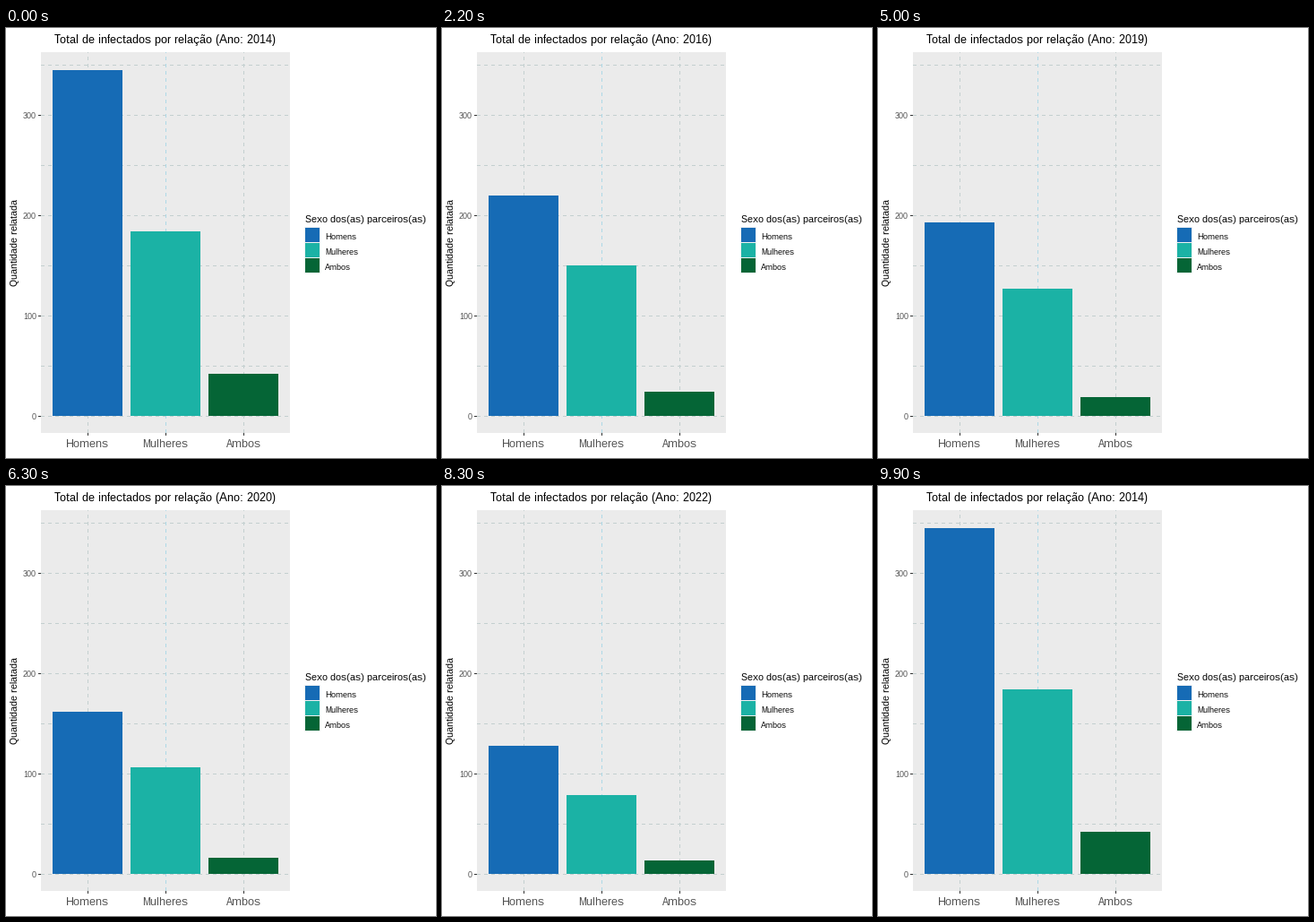
Animation of 480x480 px, one loop 10 s. Source, as a matplotlib script:

```python
import numpy as np
import matplotlib.pyplot as plt
from matplotlib.animation import FuncAnimation
from matplotlib.patches import Rectangle

plt.rcParams.update({
    "font.family": "Liberation Sans",
    "text.hinting": "native",
    "text.hinting_factor": 1,
})

SIZE, DPI = 480, 80
PX = 72 / DPI  # points per pixel
FRAMES, INTERVAL = 100, 100

ZERO_Y, UNIT = 433, 1.12
BAR_W = 78
LEFTS = [52, 139, 226]
CENTERS = [91, 178, 265]
NAMES = ["Homens", "Mulheres", "Ambos"]
COLORS = ["#166BB5", "#1BB2A5", "#056536"]
DARK, GREY = "#333333", "#4D4D4D"
GRID, GRID_MID = "#C3CFCF", "#ADD8E6"

FIRST_YEAR = 2014
DATA = np.array([
    [345, 184, 42],
    [280, 168, 34],
    [219, 152, 24],
    [222, 130, 21],
    [218, 124, 17],
    [193, 127, 19],
    [168, 112, 20],
    [150, 94, 9],
    [145, 92, 16],
    [93, 51, 9],
])
# Frames at which each year is reached and left again
ARRIVE = [0, 10, 20, 30, 40, 50, 59, 69, 79, 89, 99]
LEAVE = [0, 11, 21, 31, 41, 50, 60, 70, 80, 90, 99]

fig = plt.figure(figsize=(SIZE / DPI, SIZE / DPI), dpi=DPI, facecolor="white")
ax = fig.add_axes([0, 0, 1, 1])
ax.set_xlim(0, SIZE)
ax.set_ylim(SIZE, 0)
ax.axis("off")


def rect(x, y, w, h, color, z=1):
    patch = Rectangle((x, y), w, h, facecolor=color, lw=0, zorder=z)
    return ax.add_patch(patch)


def line(xs, ys, color, dashed=False):
    style = (0, (4, 4)) if dashed else "-"
    ax.plot(xs, ys, color=color, lw=PX, ls=style, zorder=2,
            dash_capstyle="butt", solid_capstyle="butt", snap=False)


def label(x, y, text, size, color="black", ha="left", **kw):
    return ax.text(x, y, text, fontsize=size * PX, color=color, ha=ha,
                   va="baseline", zorder=4, **kw)


def draw_panel():
    rect(39, 27, 278, 425, "#EBEBEB")
    for y in range(41, 434, 56):
        line([39, 317], [y + 0.5] * 2, GRID, dashed=True)
    for x, color in zip(CENTERS, [GRID, GRID_MID, GRID]):
        line([x + 0.5] * 2, [452, 27], color, dashed=True)

    for value in range(0, 400, 100):
        y = round(ZERO_Y - value * UNIT)
        line([36, 39], [y + 0.5] * 2, DARK)
        label(34, y + 4, str(value), 9, GREY, "right")
    for x, name in zip(CENTERS, NAMES):
        line([x + 0.5] * 2, [452, 455], DARK)
        label(x, 468, name, 12, GREY, "center")
    ax.text(15.5, 239, "Quantidade relatada", fontsize=11 * PX, rotation=90,
            ha="right", va="center", zorder=4)


def draw_legend():
    label(334, 217, "Sexo dos(as) parceiros(as)", 11)
    rect(333, 222, 18, 52, "#F2F2F2")
    for i, (name, color) in enumerate(zip(NAMES, COLORS)):
        y = 223 + 17 * i
        rect(334, y, 16, 16, color, 3)
        label(356, y + 13, name, 9)


def state_at(frame):
    """Bar values and the displayed year for a frame."""
    i = max(k for k, start in enumerate(ARRIVE) if start <= frame)
    here = DATA[i % len(DATA)]
    if frame <= LEAVE[i]:
        return here, FIRST_YEAR + i % len(DATA)
    after = DATA[(i + 1) % len(DATA)]
    step = frame - LEAVE[i]
    t = step / (ARRIVE[i + 1] - LEAVE[i])
    year = FIRST_YEAR + (i + (step > 5)) % len(DATA)
    return here + (after - here) * t, year


draw_panel()
draw_legend()
bars = [rect(x, ZERO_Y, BAR_W, 0, c, 3) for x, c in zip(LEFTS, COLORS)]
title = label(178, 17, "", 13, ha="center")


def update(frame):
    values, year = state_at(frame)
    for bar, value in zip(bars, values):
        top = round(ZERO_Y - value * UNIT)
        bar.set_y(top)
        bar.set_height(ZERO_Y - top)
    title.set_text(f"Total de infectados por relação (Ano: {year})")
    return [*bars, title]


anim = FuncAnimation(fig, update, frames=FRAMES, interval=INTERVAL,
                     repeat=True, repeat_delay=0, blit=False)
plt.show()
```
